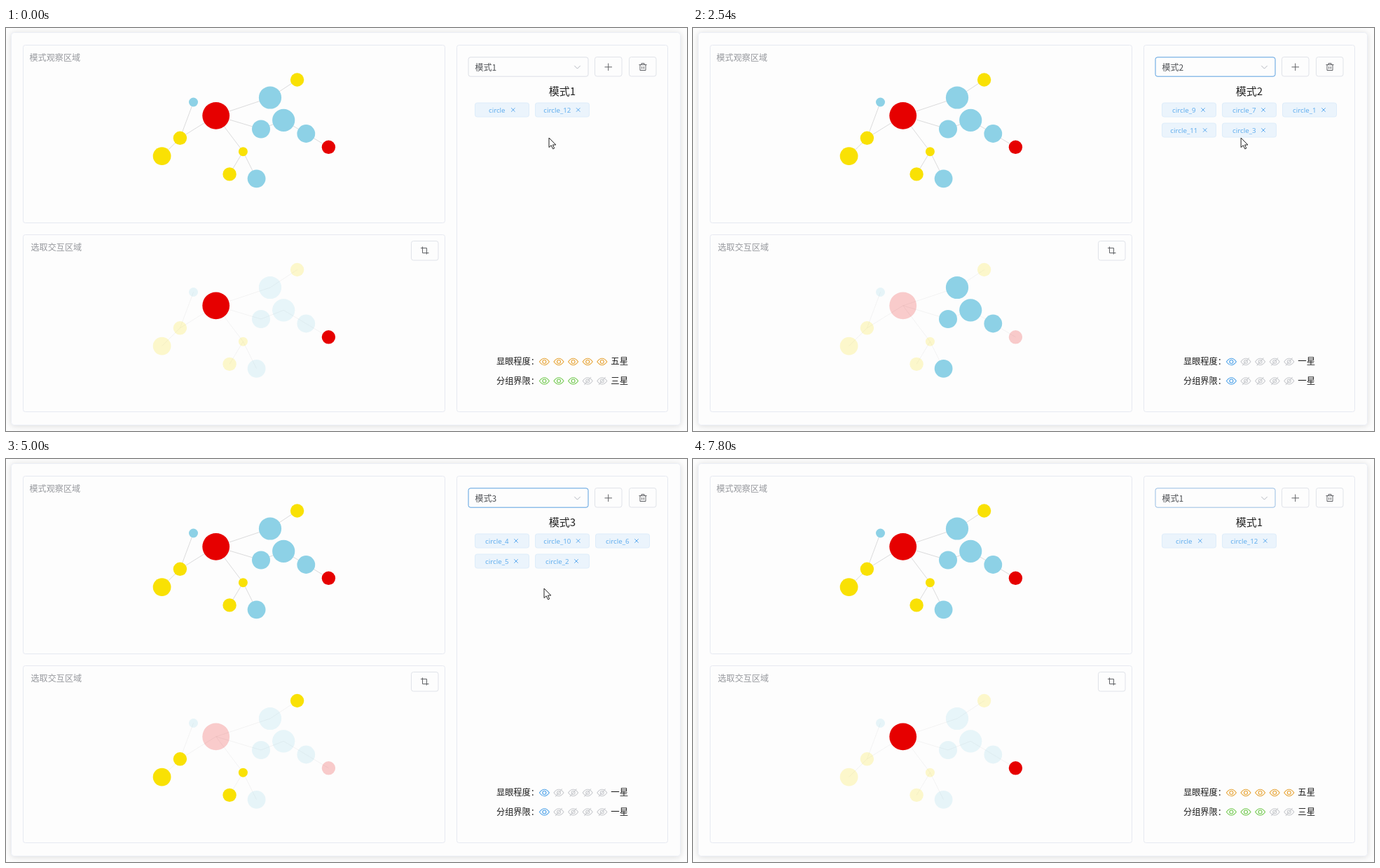
An HTML page that plays this animation: 972x576 px, repeating every 7830 ms.

```html
<!DOCTYPE html>
<html lang="zh">
<head>
<meta charset="utf-8">
<style>
html, body { margin: 0; width: 100%; height: 100%; overflow: hidden; background: #fdfdfd; }
svg { display: block; width: 972px; height: 576px; font: 12px "Noto Sans CJK SC", "Noto Sans CJK", "Noto Sans", sans-serif; }
.box { fill: #fdfdfd; stroke: #e6e9f1; }
.btn { fill: #fdfdfd; stroke: #e0e3e9; }
.icon { fill: none; stroke: #606266; stroke-width: 1; }
.card { fill: #fdfdfd; stroke: #ebeef5; filter: drop-shadow(0 1px 5px rgba(0,0,0,.13)); }
.menu { filter: drop-shadow(0 2px 5px rgba(0,0,0,.12)); }
.label { fill: #96989d; font-size: 12.1px; }
.edge { stroke: #d2d2d4; stroke-width: .8; }
.tag rect { fill: #ebf4fc; stroke: #deedfa; }
.tag text { font: 9.7px "Noto Sans", sans-serif; fill: #62aeee; text-anchor: middle; }
.tag path { stroke: #5aa9ef; stroke-width: 1; }
.eye { fill: none; stroke-width: 1.1; }
.cursor path { fill: #fff; stroke: #222; stroke-width: 1; stroke-linejoin: round; }
</style>
</head>
<body>
<svg id="stage" viewBox="0 0 972 576"></svg>
<script>
const LOOP = 7830;
const NS = "http://www.w3.org/2000/svg";
const stage = document.getElementById("stage");

function add(parent, name, attrs = {}, text) {
  const el = document.createElementNS(NS, name);
  for (const k in attrs) el.setAttribute(k, attrs[k]);
  if (text !== undefined) el.textContent = text;
  parent.appendChild(el);
  return el;
}
const group = (parent, cls = "") => add(parent, "g", { class: cls });
const rect = (p, cls, x, y, width, height, rx = 3) =>
  add(p, "rect", { class: cls, x, y, width, height, rx });
const path = (p, cls, d) => add(p, "path", { class: cls, d });
const show = (el, on) => { el.style.display = on ? "" : "none"; };

function bezier(x1, y1, x2, y2) {
  const at = (a, b, s) => 3 * a * s * (1 - s) ** 2 + 3 * b * s * s * (1 - s) + s ** 3;
  return x => {
    if (x <= 0) return 0;
    if (x >= 1) return 1;
    let lo = 0, hi = 1;
    for (let i = 0; i < 24; i++) {
      const mid = (lo + hi) / 2;
      if (at(x1, x2, mid) < x) lo = mid; else hi = mid;
    }
    return at(y1, y2, lo);
  };
}
const ease = bezier(.25, .1, .25, 1);
const easeInOut = bezier(.42, 0, .58, 1);
const menuEase = bezier(.23, 1, .32, 1);
const tagEase = bezier(.55, 0, .1, 1);

const mix = (a, b, p) => `rgb(${a.map((v, i) => Math.round(v + (b[i] - v) * p))})`;
const GREY = [200, 202, 206], BLUE = [74, 160, 232], GREEN = [112, 200, 76], GOLD = [230, 162, 50];
const LINE = [220, 223, 230], FOCUS = [90, 160, 224];

// Timeline
const choices = [[-1000, 0], [1685, 1], [4283, 2], [6500, 0]];
const opens = [[792, 1685], [2950, 4283], [5756, 6500]];
const FOCUS_ON = 792, FOCUS_OFF = 7705;
const route = [
  [0, 775, 157], [220, 775, 157], [680, 813, 54], [1050, 813, 54], [1500, 779, 121],
  [2000, 779, 121], [2350, 782, 160], [2500, 782, 160], [2850, 787, 51], [3350, 787, 51],
  [4000, 765, 164], [4500, 765, 164], [4800, 768, 185], [5150, 768, 185], [5600, 771, 55],
  [5900, 771, 55], [6330, 765, 97], [6600, 765, 97], [7150, 800, -24]
];

const modes = [
  { color: "red", tags: ["circle", "circle_12"], rates: [5, 3] },
  { color: "blue", tags: ["circle_9", "circle_7", "circle_1", "circle_11", "circle_3"], rates: [1, 1] },
  { color: "yellow", tags: ["circle_4", "circle_10", "circle_6", "circle_5", "circle_2"], rates: [1, 1] }
];
const names = ["模式1", "模式2", "模式3"];
const stars = { 1: "一星", 3: "三星", 5: "五星" };
const rateColor = n => n > 3 ? GOLD : n > 2 ? GREEN : BLUE;

// Graph
const fills = { red: "#e60000", blue: "#8dd1e6", yellow: "#f9e104" };
const nodes = [
  [299.7, 125.3, 19.4, "red"], [377, 99.5, 16.1, "blue"], [415.6, 74, 9.7, "yellow"],
  [364, 144.5, 13, "blue"], [396.2, 131.8, 16.1, "blue"], [428.3, 151, 12.9, "blue"],
  [460.4, 170.3, 9.7, "red"], [338.4, 176.7, 6.5, "yellow"], [319.1, 208.9, 9.7, "yellow"],
  [357.6, 215.3, 12.9, "blue"], [248.4, 157.3, 9.7, "yellow"], [267.5, 106, 6.5, "small"],
  [222.6, 183.1, 12.9, "yellow"]
];
const links = [[0, 1], [1, 2], [0, 3], [3, 4], [4, 5], [5, 6], [0, 7], [7, 8], [7, 9], [0, 10], [10, 11], [10, 12]];

function graph(dy, edgeOpacity) {
  const g = group(stage);
  g.setAttribute("transform", `translate(0 ${dy})`);
  for (const [a, b] of links) add(g, "line", {
    class: "edge", opacity: edgeOpacity,
    x1: nodes[a][0], y1: nodes[a][1], x2: nodes[b][0], y2: nodes[b][1]
  });
  return nodes.map(([cx, cy, r, c]) => add(g, "circle", { cx, cy, r, fill: fills[c] || fills.blue }));
}

rect(stage, "card", 7.5, 6.5, 955, 561, 4);
rect(stage, "box", 24.5, 24.5, 602, 254);
rect(stage, "box", 24.5, 295.5, 602, 253);
rect(stage, "box", 643.5, 24.5, 301, 524);
graph(0, 1);
const picks = graph(271.5, .3);
add(stage, "text", { class: "label", x: 33.5, y: 46.6 }, "模式观察区域");
add(stage, "text", { class: "label", x: 35.5, y: 318 }, "选取交互区域");

rect(stage, "btn", 578.5, 304.5, 38.5, 27.5);
path(stage, "icon", "M594.5 312.5V321.5H603.5M592 314.5H600.5V323.5");
rect(stage, "btn", 840.5, 41.5, 38.5, 27.5);
path(stage, "icon", "M854.5 55.8H865M859.7 50.5V61");
rect(stage, "btn", 889.5, 41.5, 38.5, 27.5);
path(stage, "icon", "M903.5 52.5H914.5M907 52V50.5H911V52M905 52.5V60.5H913V52.5M907.7 55V58.5M910.3 55V58.5");

// Select field
const field = rect(stage, "btn", 660, 41.8, 171, 27.4);
const fieldText = add(stage, "text", { x: 669.5, y: 60.7 });
const chevron = path(stage, "icon", "M-4.2 -2.1L0 2.1L4.2 -2.1");
chevron.style.stroke = "#b4b8bf";
const title = add(stage, "text", { x: 794, y: 96.3, "font-size": 15, "text-anchor": "middle", fill: "#222" });

// Tags
const textWidth = s => 24 + (s.length > 6 ? 3 + 5.4 * (s.length - 7) : 0);
const tagSets = modes.map(m => {
  const set = group(stage);
  const items = m.tags.map((s, i) => {
    const g = group(set, "tag"), w = textWidth(s);
    rect(g, "", -38.5, -10, 77, 20);
    add(g, "text", { x: -7.2, y: 3.6 }, s);
    const x = w / 2 + 3.8;
    path(g, "", `M${x - 2.7} -2.7l5.4 5.4m0 -5.4l-5.4 5.4`);
    return { g, x: 708 + 86 * (i % 3), y: 117 + 29 * Math.floor(i / 3) };
  });
  return { set, items };
});

// Ratings
const rows = ["显眼程度：", "分组界限："].map((label, r) => {
  const y = 477 + r * 27.5;
  add(stage, "text", { x: 700, y: y + 4.4, fill: "#1c1c1c", "font-size": 12.2 }, label);
  const eyes = [0, 1, 2, 3, 4].map(i => {
    const g = group(stage, "eye");
    g.setAttribute("transform", `translate(${768.4 + 20.6 * i} ${y})`);
    path(g, "", "M-7 0C-4.6 -3.4 -2.4 -4.7 0 -4.7S4.6 -3.4 7 0C4.6 3.4 2.4 4.7 0 4.7S-4.6 3.4 -7 0Z");
    add(g, "circle", { r: 2.5 });
    return { g, slash: path(g, "", "M4.8 -5.5L-4.8 5.5") };
  });
  return { eyes, text: add(stage, "text", { x: 863.3, y: y + 4.4, fill: "#1c1c1c", "font-size": 12.4 }) };
});

// Dropdown
const menu = group(stage, "menu");
rect(menu, "box", 660, 80, 172, 98.5);
path(menu, "", "M739 80.6L745 75.5L751 80.6Z").setAttribute("fill", "#fdfdfd");
const hover = rect(menu, "", 660.5, 86, 171, 29, 0);
hover.setAttribute("fill", "#f2f5fb");
const options = names.map((s, i) => add(menu, "text", { x: 677, y: 105 + 29.2 * i }, s));

// Cursors
const arrow = group(stage, "cursor");
path(arrow, "", "M0 0V13.6L3.2 10.7L5.6 15.8L7.7 14.9L5.4 10H9.8Z");
const hand = group(stage, "cursor");
path(hand, "", "M-1.5 .6Q-.2 -1 1.1 .6V5.6Q2.4 4.6 3.4 6Q4.7 5.2 5.5 6.6Q7 6 7.4 7.8V11.5Q7 13.5 5.8 16H-1.2Q-2.4 13.4 -5 10.4Q-6 8.6 -4.3 8.4L-1.5 10.4Z");
path(hand, "", "M1.1 5.6V8.4M3.4 6.2V8.6M5.5 6.8V8.8");

function pointer(t) {
  let i = 0;
  while (i < route.length - 2 && t > route[i + 1][0]) i++;
  const [t0, x0, y0] = route[i], [t1, x1, y1] = route[i + 1];
  const p = easeInOut((t - t0) / (t1 - t0));
  return [x0 + (x1 - x0) * p, y0 + (y1 - y0) * p];
}

function render(t) {
  const step = choices.filter(c => c[0] <= t).length - 1;
  const [since, mode] = choices[step];
  const before = modes[choices[Math.max(step - 1, 0)][1]];
  const now = modes[mode];
  const last = opens.filter(o => o[0] <= t).pop();
  const isOpen = !!last && t < last[1];

  let scale = 0, turn = 0, menuLive = false;
  if (last) {
    const age = (t - last[isOpen ? 0 : 1]) / 300;
    scale = isOpen ? menuEase(age) : 1 - menuEase(age);
    turn = isOpen ? ease(age) : 1 - ease(age);
    menuLive = isOpen || age < 1;
  }

  const [x, y] = pointer(t);
  const inX = x > 660 && x < 832;
  const inMenu = menuLive && inX && y > 80 && y < 179;
  const isHand = inMenu || (inX && y > 41 && y < 70);
  show(hand, isHand);
  show(arrow, !isHand);
  (isHand ? hand : arrow).setAttribute("transform", `translate(${x} ${y})`);

  show(menu, scale > .005);
  menu.setAttribute("transform", `translate(0 80) scale(1 ${scale}) translate(0 -80)`);
  menu.setAttribute("opacity", scale);
  const row = isOpen && inMenu ? Math.max(0, Math.min(2, Math.floor((y - 86) / 29.2))) : mode;
  hover.setAttribute("y", 86 + 29.2 * row);
  options.forEach((o, i) => o.setAttribute("fill", i === mode ? "#409eff" : "#55575c"));

  const focus = ease((t - FOCUS_ON) / 200) * (1 - easeInOut((t - FOCUS_OFF) / 200));
  field.style.stroke = mix(LINE, FOCUS, focus);
  fieldText.textContent = title.textContent = names[mode];
  fieldText.setAttribute("fill", isOpen ? "#a3a5aa" : "#4e5054");
  chevron.setAttribute("transform", `translate(815.5 56) rotate(${180 * turn})`);

  const grow = tagEase((t - since) / 300);
  tagSets.forEach(({ set, items }, i) => {
    show(set, i === mode);
    if (i !== mode) return;
    set.setAttribute("opacity", grow);
    for (const it of items) it.g.setAttribute("transform", `translate(${it.x} ${it.y}) scale(${grow} 1)`);
  });

  picks.forEach((c, i) => c.setAttribute("opacity", nodes[i][3] === now.color ? 1 : .2));

  const fade = ease((t - since) / 300);
  rows.forEach(({ eyes, text }, r) => {
    const n = now.rates[r], old = before.rates[r];
    const tint = (i, k) => i < k ? rateColor(k) : GREY;
    eyes.forEach(({ g, slash }, i) => {
      g.setAttribute("stroke", mix(tint(i, old), tint(i, n), fade));
      show(slash, i >= n);
    });
    text.textContent = stars[n];
  });
}

const start = performance.now();
function tick() {
  render((performance.now() - start) % LOOP);
  requestAnimationFrame(tick);
}
tick();
</script>
</body>
</html>
```
